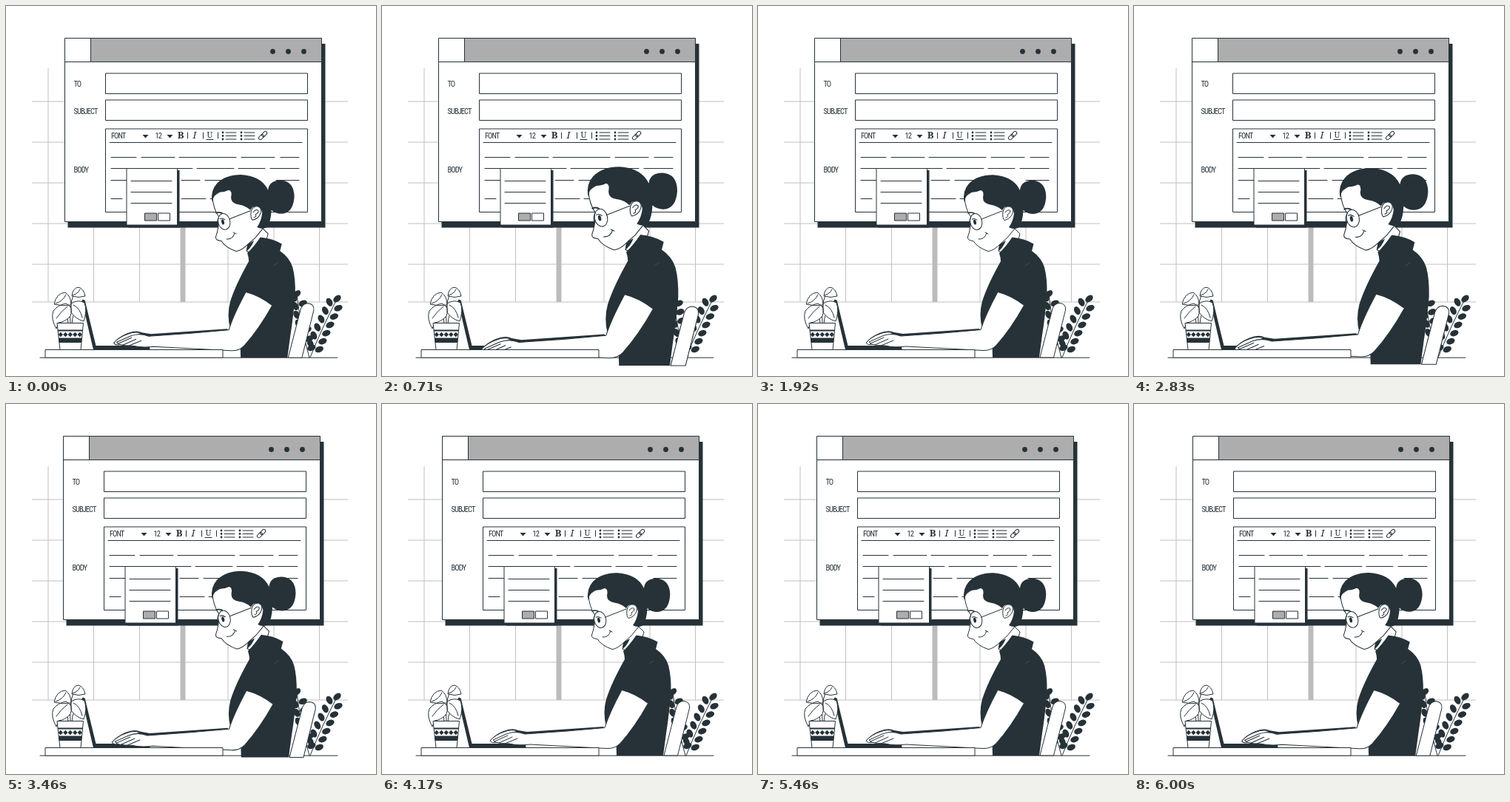
An HTML page that plays this animation: 500 by 500 pixels, repeating every 6.04 s.

```html
<!DOCTYPE html>
<html lang="en">
<head>
<meta charset="utf-8">
<title>Writing an email</title>
<style>
  html, body { margin: 0; width: 100%; height: 100%; overflow: hidden; background: #fff; }
  svg { display: block; width: 100%; height: 100%; }
  .o { fill: #fff; stroke: #263238; stroke-width: 1; stroke-linejoin: round; }
  .l { fill: none; stroke: #263238; stroke-width: 1; stroke-linecap: round; stroke-linejoin: round; }
  .d { fill: #263238; }
  .grid { fill: none; stroke: #c0c0c0; stroke-width: 1; }
  .label { font: 10.5px 'Roboto Condensed', 'Open Sans Condensed', 'Open Sans', 'Noto Sans', sans-serif;
    font-stretch: extra-condensed; letter-spacing: -.95px; }
  .serif { font: 13px 'Noto Serif', 'Liberation Serif', serif; text-anchor: middle; }
</style>
</head>
<body>
<svg viewBox="0 0 500 500">
  <path class="grid" d="M35 129H462M35 184H462M35 239H462M35 294H462M35 349H462M35 400H462
    M57 84V400M118.500 129V400M180.500 129V400M300 129V400M362 129V400M423.500 129V400"/>
  <path fill="#bcbcbc" d="M235.500 290H242.500V400H235.500Z"/>
  <g id="foliage" class="d"></g>

  <g id="mail">
    <path class="d" d="M83.500 51H431.500V299.500H83.500Z"/>
    <path class="o" d="M79.500 43.500H426.500V291.500H79.500Z"/>
    <path class="o" style="fill:#adadad" d="M114.500 43.500H426.500V75.500H114.500Z"/>
    <path class="l" d="M79.500 75.500H114.500"/>
    <g class="d"><circle cx="360.500" cy="61.500" r="3.400"/><circle cx="381.500" cy="61.500" r="3.400"/><circle cx="402.500" cy="61.500" r="3.400"/></g>
    <path class="o" d="M134.500 91H407.500V118.500H134.500ZM134.500 127H407.500V154.500H134.500ZM134.500 166H407.500V278.500H134.500Z"/>
    <g class="d label">
      <text x="91.500" y="108.500">TO</text>
      <text x="91.500" y="146">SUBJECT</text>
      <text x="91.500" y="225">BODY</text>
      <text x="142" y="178.500">FONT</text>
      <text x="201.500" y="178.500">12</text>
    </g>
    <path class="d" d="M184.500 174H192.500L188.500 178.500ZM217.500 174H225.500L221.500 178.500Z"/>
    <g class="d serif">
      <text x="236" y="179" style="font-weight:700">B</text>
      <text x="255" y="179" style="font-style:italic">I</text>
      <text x="275.500" y="178" style="font-size:11px">U</text>
    </g>
    <path class="l" d="M245.500 171V179M266.500 171V179M286.500 171V179M271 180.500H280"/>
    <path class="l" d="M297 171H311M297 175.500H311M297 180H311M322 171H336M322 175.500H336M322 180H336"/>
    <path class="l" stroke-dasharray="0 4.500" style="stroke-width:2.800" d="M293 171V180.500M318 171V180.500"/>
    <g class="l" transform="rotate(-45 347 175)"><rect x="340" y="172.800" width="8" height="4.600" rx="2.300"/><rect x="346" y="172.800" width="8" height="4.600" rx="2.300"/></g>
    <path class="l" d="M140 184.500H400M142 204.500H176M183 204.500H228M234 204.500H311M318 204.500H363M371 204.500H396
      M142 219.500H252M258 219.500H308M314 219.500H350M357 219.500H396M142 235.500H175M237 235.500H262M269 235.500H340M365 235.500H396
      M142 260.500H157M237 260.500H270M276 260.500H330"/>
    <path class="d" d="M166 222H234.500V299.500H166Z"/>
    <path class="o" d="M163 219.500H231.500V296H163Z"/>
    <path class="l" d="M169 236.500H224M169 251.500H224M169 266.500H224"/>
    <path class="o" style="fill:#adadad" d="M187.500 280H203.500V290H187.500Z"/>
    <path class="o" d="M205.500 280H221.500V290H205.500Z"/>
  </g>

  <path class="l" d="M46 475.200H448"/>
  <path class="d" d="M102.500 398Q104 395.500 106.700 398L121.500 459H192Q194.500 459 194.500 464.500H118Z"/>

  <g id="woman">
    <path class="o" d="M381 475L398 409Q401 401.500 408 401.500Q416.500 402.500 415.500 411L399.500 475Z"/>
    <!-- far arm -->
    <path class="d" d="M146 455Q152 447 164 442Q176 437 184 441L196 443L299 436L306 446L200 452Z"/>
    <path class="o" d="M146 455Q153 447 165 443Q175 439 183 442L170 447L156 457Q148 459 146 455Z"/>
    <!-- neck -->
    <path class="o" d="M328 318L325 331L333 335L350 322L354 308L342 296Z"/>
    <path class="d" d="M335 317L326 322L325 331Q331 327 335 317Z"/>
    <!-- shirt -->
    <path class="d" d="M326 334Q335 325 343.500 312.500Q360 314 372.500 321.500L370 331Q383 340 387 353Q391 368 390.500 390Q388 420 384 445L380 475H317L316 440L303 436Q298 417 303 399Q310 377 328 345Q328 340 326 334Z"/>
    <!-- near arm -->
    <path class="o" d="M324 386.500Q342 391 359.500 404.500Q342 436 322 458.500Q315 466 304 465.500L200 460Q184 462 172 459Q160 459 153 457L150 454L168 446Q180 441 193 446L250 442L301 437.500Q307 418 324 386.500Z"/>
    <path class="l" d="M152 456L170 448M158 458L176 450M166 459L183 452"/>
    <path class="l" style="stroke:#58636a;stroke-width:.5" d="M367 347Q364 349 361 351"/>
    <!-- head -->
    <path class="o" d="M279 258Q280 274 287.500 285Q288 300 283.500 312Q282.500 317 291 317.500Q296 326 311 331.500Q318 331 328 321L337 313L350 297L344 250L305 240Z"/>
    <path class="d" d="M278.500 265Q276 250 285 240Q297 228 318 228.300Q345 230 354 249Q355 236 371 235.800Q389 237 389.300 258Q388 280 372 281Q364 281 358.500 276Q358 290 353 299Q346 303 339 299Q345 291 346 280Q344 268 333 272L330 276Q324 270 314 268.500Q304 267 304 259Q306 250 301 249Q295 252 288 252Q281 254 278.500 265Z"/>
    <path class="o" d="M331 278Q333 270 340 271Q346 273 344 280Q341 288 333 289.500Q330 287 331 278Z"/>
    <path class="l" d="M334 279Q338 273.500 341 277Q341 280 337 282Q339 285 335 286"/>
    <ellipse class="o" cx="294.700" cy="291.500" rx="8" ry="11" transform="rotate(-12 294.700 291.500)"/>
    <path class="l" d="M302 288L330 277M287.500 286Q285 289 286 297"/>
    <path class="l" style="stroke-width:1.700" d="M284 280Q287 278 292 280"/>
    <ellipse class="d" cx="293" cy="292" rx="1.900" ry="3.600" transform="rotate(-12 293 292)"/>
    <path class="l" d="M289 288Q292 286 296 289M298 315Q306 316 309 307M307 306L311 308"/>
  </g>

  <path class="o" d="M53 464.500H293V475.200H53Z"/>
  <g id="plant">
    <path class="l" d="M87 430Q85 405 91 391M84 430Q84 414 75 400M89 430Q89 415 101 402"/>
    <path class="o" d="M65 403Q68 388 80 387Q88 392 88 404Q76 406 65 403ZM89 392Q90 381 98 380Q105 382 107 392Q98 395 89 392ZM68 436Q60 422 64 412Q70 404 81 402Q92 407 87 419Q80 427 71 428ZM88 402Q98 396 106 401Q110 412 105 426Q94 423 88 414Z"/>
    <path class="l" d="M67 402Q77 399 81 390M90 391Q97 389 100 383M68 422Q74 413 83 406M91 404Q100 408 103 421"/>
    <path class="o" d="M69 428.500H104.500L101 464.500H73Z"/>
    <path class="d" d="M69.800 437.500H103.600L103.400 439.500H70ZM70.900 448.500H102.700L102 455H71.700Z"/>
    <path id="gems" class="d"/>
  </g>
</svg>
<script>
  const $ = id => document.getElementById(id);
  const LOOP = 6040, CYCLE = 6000, LEAD = 16;

  // Leaves in pairs along a curved stem: base, bend and tip.
  function branch([x0, y0], [x1, y1], [x2, y2], pairs) {
    const at = u => [
      (1 - u) ** 2 * x0 + 2 * u * (1 - u) * x1 + u * u * x2,
      (1 - u) ** 2 * y0 + 2 * u * (1 - u) * y1 + u * u * y2];
    const leaf = (x, y, turn) =>
      `<ellipse rx="5.900" ry="4" transform="translate(${x} ${y}) rotate(${turn})"/>`;
    let out = `<path class="l" d="M${x0} ${y0}Q${x1} ${y1} ${x2} ${y2}"/>` + leaf(x2, y2, -40);
    for (let i = 0; i < pairs; i++) {
      const [x, y] = at(.17 + .7 * i / (pairs - 1));
      out += leaf(x - 5, y - 6, 62) + leaf(x + 7, y + 2, -22);
    }
    return out;
  }
  $('foliage').innerHTML =
    branch([411, 475], [426, 437], [447.500, 395.500], 6) +
    branch([410, 475], [397, 430], [393, 389], 6);

  $('gems').setAttribute('d', [0, 1, 2, 3, 4]
    .map(i => `M${73.800 + i * 6.500} 440.800l3.200 3.200-3.200 3.200-3.200-3.200z`).join(''));

  // Piecewise linear value from [position, value] stops.
  function mix(stops, p) {
    const i = Math.max(1, stops.findIndex(s => s[0] >= p));
    const [a, va] = stops[i - 1], [b, vb] = stops[i];
    return va + (vb - va) * (p - a) / (b - a);
  }
  const shake = [0, -1, 2, -4, 4, -4, 4, -4, 2, -1, 0].map((x, i) => [i / 10, x]);
  const beat = [[0, 1], [.1, 1.1], [.3, 1], [.4, 1], [.5, 1.1], [.6, 1], [1, 1]];

  const start = performance.now();
  function draw(now) {
    const t = (Math.max(0, now - start) % LOOP + LEAD) % CYCLE;
    // The window moves in whole pixels.
    const x = Math.round(mix(shake, t % 1500 / 1500) + .25);
    $('mail').setAttribute('transform', `translate(${x} 0)`);
    $('woman').setAttribute('transform',
      `translate(280.500 351.500) scale(${mix(beat, t / CYCLE)}) translate(-280.500 -351.500)`);
    requestAnimationFrame(draw);
  }
  draw(start);
</script>
</body>
</html>
```
